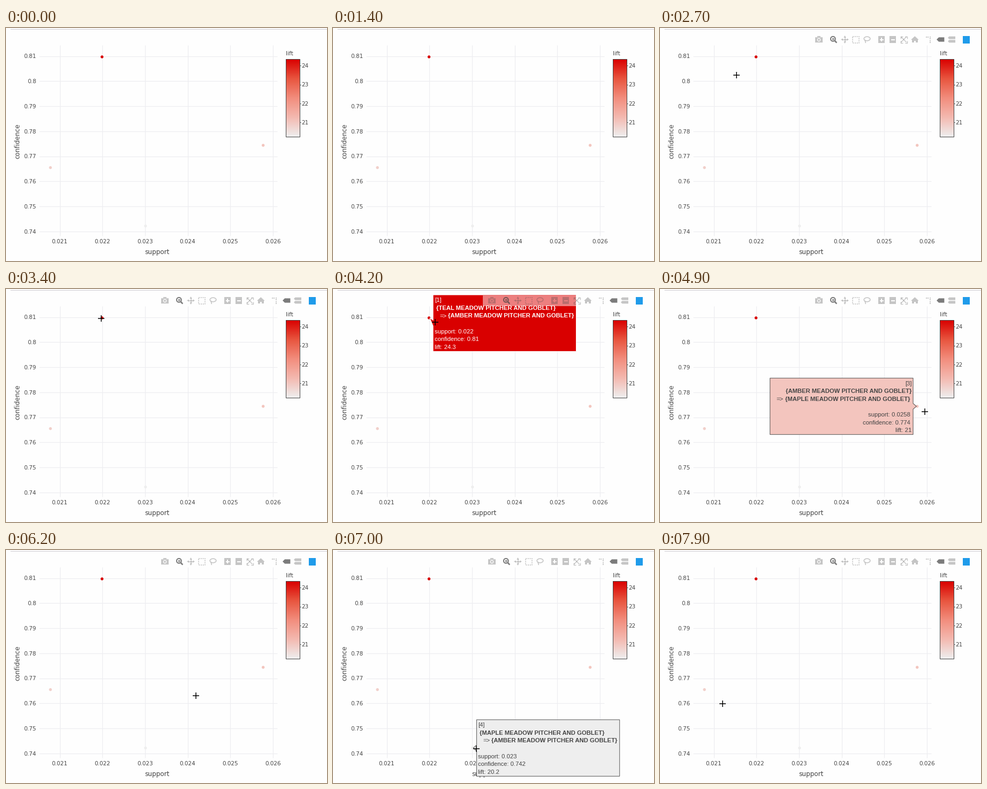
Recreate the animation shown at these times as a matplotlib script. Size 600 by 435 pixels, loop 8000 ms.

```python
import numpy as np
import matplotlib.pyplot as plt
from matplotlib.animation import FuncAnimation
from matplotlib.colors import LinearSegmentedColormap
from matplotlib.patches import PathPatch, Polygon, Rectangle
from matplotlib.path import Path

W, H, DPI = 600, 435, 80
STEP, FRAMES = 100, 80
PT = 72 / DPI  # points per pixel
INK, BG = "#444444", "#fefefe"
SOFT, STRONG = (INK, 0.3), (INK, 0.7)

fig = plt.figure(figsize=(W / DPI, H / DPI), dpi=DPI, facecolor=BG)
ax = fig.add_axes([0, 0, 1, 1])
ax.axis("off")

cmap = LinearSegmentedColormap.from_list(
    "lift", ["#eeeeee", "#f4b9b0", "#f28d7d", "#e8553f", "#d90000"])


def line(xs, ys, color=INK, width=1.0, **kw):
    return ax.plot(xs, ys, color=color, lw=width * PT,
                   solid_capstyle="butt", **kw)[0]


def text(x, y, s, size=10.4, font="DejaVu Sans", color=INK, **kw):
    return ax.text(x, y, s, fontsize=size * PT, family=font, color=color,
                   va="baseline", **kw)


# ---- data to pixels ----------------------------------------------------
def px(support):
    return 100.6 + 79680 * (support - 0.021)


def py(confidence):
    return 52.5 + 4677 * (0.81 - confidence)


def shade(lift):
    return cmap(float(lift - 20.2) / 4.1)


# support, confidence, lift
RULES = [(0.02199, 0.8097, 24.3), (0.02078, 0.7655, 20.8),
         (0.02577, 0.7744, 21.0), (0.02301, 0.7422, 20.2)]


def draw_chart():
    line([8, W], [1.5, 1.5], "#cfccd2")
    for s in np.arange(0.021, 0.0265, 0.001):
        line([px(s)] * 2, [32, 388], "#ededf1", 1.2, zorder=1)
        text(px(s), 402, f"{s:.3f}", ha="center")
    for c in np.arange(0.74, 0.815, 0.01):
        line([62, 507], [py(c)] * 2, "#ededf1", 1.2, zorder=1)
        text(57, py(c) + 3.9, f"{c:.2g}", ha="right")
    text(282, 422, "support", 12, ha="center")
    text(25, 211.5, "confidence", 12, ha="center", rotation=90,
         rotation_mode="anchor")

    for s, c, lift in RULES:
        ax.add_patch(plt.Circle((px(s), py(c)), 2.7, fc=shade(lift),
                                ec="none", zorder=3))

    ax.imshow(np.linspace(1, 0, 256)[:, None], cmap=cmap, aspect="auto",
              extent=(523, 549, 203, 58), zorder=2)
    ax.add_patch(Rectangle((522.8, 57.8), 26, 145.2, fc="none", ec=INK,
                           lw=PT, zorder=3))
    text(523, 51.3, "lift")
    for lift in range(21, 25):
        y = 70.2 + 35.3 * (24 - lift)
        line([549, 551], [y, y])
        text(552.2, y + 3.9, lift)
    ax.set(xlim=(0, W), ylim=(H, 0))


# ---- toolbar -----------------------------------------------------------
def rect(x, y, w, h):
    return np.array([(x - w / 2, y - h / 2), (x + w / 2, y - h / 2),
                     (x + w / 2, y + h / 2), (x - w / 2, y + h / 2)])


def disc(x, y, r, n=32, turn=0.0):
    a = turn + np.arange(n) * 2 * np.pi / n
    return np.column_stack([x + r * np.cos(a), y + r * np.sin(a)])


def tag(x, y, w, h):
    tip, tail, half = x - w / 2, x + w / 2, h / 2
    neck = tip + half
    return np.array([(tip, y), (neck, y - half), (tail, y - half),
                     (tail, y + half), (neck, y + half)])


def draw_toolbar():
    parts = []
    mid = 21.5

    def fill(outer, *holes, color=SOFT, z=11):
        loops = [outer] + [h[::-1] for h in holes]
        paths = [Path(np.vstack([p, p[:1]]), closed=True) for p in loops]
        parts.append(ax.add_patch(PathPatch(
            Path.make_compound_path(*paths), fc=color, ec="none", zorder=z)))

    def stroke(xs, ys, width=1.5, color=SOFT, **kw):
        parts.append(line(xs, ys, color, width, zorder=11, **kw))

    fill(rect(431.5, mid, 303, 20), color=("white", 0.5), z=10)

    # camera
    fill(rect(297, 22.2, 14, 9.8), disc(297, 22, 3.3))
    fill(disc(297, 22, 2))
    fill(rect(297, 16.4, 5.5, 1.8))

    # magnifier
    fill(disc(323.3, 20.3, 5.4), disc(323.3, 20.3, 3.4), color=STRONG)
    stroke([326.9, 330.3], [23.9, 27.6], 2.6, STRONG)
    stroke([321, 325.6], [20.3, 20.3], 1.2, STRONG)
    stroke([323.3, 323.3], [18, 22.6], 1.2, STRONG)

    # pan
    stroke([341, 350], [mid, mid])
    stroke([345.5, 345.5], [17, 26])
    for a in np.arange(4) * np.pi / 2:
        fill(disc(345.5 + 5 * np.cos(a), mid + 5 * np.sin(a), 2.5, 3, a))

    # box select, lasso
    box = rect(366, mid, 12, 12)
    stroke(*np.vstack([box, box[:1]]).T, 1.7, ls=(0, (1.2, 1)))
    a = np.linspace(2.3, 2.3 + 2 * np.pi, 40)
    stroke(np.append(387 + 5.8 * np.cos(a), 384.5),
           np.append(20 + 3.8 * np.sin(a), 28), 1.6)

    # zoom in, zoom out
    bar = rect(0, mid, 7, 2)
    stems = [rect(0, mid + d, 2, 2.5) for d in (-2.25, 2.25)]
    for x, holes in [(414, [bar] + stems), (435, [bar])]:
        fill(rect(x, mid, 12.4, 12.4), *[h + (x, 0) for h in holes])

    # autoscale
    for sx in (-1, 1):
        for sy in (-1, 1):
            x, y = 455.5 + 6 * sx, mid + 6 * sy
            stroke([455.5, x - sx], [mid, y - sy], 1.4)
            stroke([x - 4 * sx, x, x], [y, y, y - 4 * sy], 1.4)

    # home
    fill(np.array([(469, 22), (476.3, 15.3), (483.6, 22)]))
    fill(rect(476.3, 24.7, 10.4, 5.4), rect(476.3, 25.6, 3, 3.6))

    # spike lines
    for k in range(3):
        fill(rect(497.5 + 3.7 * k, 17.2, 2, 2))
        fill(rect(505.2, 20.4 + 3.3 * k, 2, 2))

    # hover tags
    fill(tag(524.2, mid, 14.4, 8.2), color=STRONG)
    for y in (mid - 3.3, mid + 3.3):
        fill(tag(545, y, 14, 5))

    fill(rect(572.4, 21.6, 13.8, 13.8), color="#1f9bea")
    return parts


# ---- hover labels ------------------------------------------------------
def draw_label(n, lhs, rhs, side=1):
    """Callout for rule n; side is 1 to open rightwards, -1 leftwards."""
    support, conf, lift = RULES[n - 1]
    x, y = px(support), py(conf)
    top = max(y - 52.7, 11)
    mid, low = top + 52.7, top + 105.4
    near, far = x + 7.6 * side, x + 275 * side
    color = shade(lift)
    ink = "white" if color[1] < 0.5 else INK
    parts = [ax.add_patch(Polygon(
        [(near, mid - 5.3), (x + 1.3 * side, y), (near, mid + 5.3),
         (near, low), (far, low), (far, top), (near, top)],
        fc=color, ec=ink, lw=0.9 * PT, zorder=6))]
    style = dict(ha="left" if side > 0 else "right", zorder=7)

    def row(i, s, shift=2.7, **kw):
        t = text(near + shift * side, top + 13.2 + 14.6 * i, s, 11.3,
                 "Liberation Sans", ink, **style, **kw)
        parts.append(t)
        return t

    row(0, f"[{n}]")
    row(1, "{" + lhs + "}", 5.7 if side > 0 else 2.7, weight="bold")
    bold = row(2, "{" + rhs + "}", 28 if side > 0 else 5.7, weight="bold")
    parts.append(ax.annotate(
        "=>", xy=(0, bold.get_position()[1]), xycoords=(bold, "data"),
        xytext=(-3 * PT, 0), textcoords="offset points", ha="right",
        va="baseline", fontsize=11.3 * PT, family="Liberation Sans",
        color=ink, zorder=7, annotation_clip=False))
    pad = 2.7 if side > 0 else 5.7
    row(4, f"support: {support:.3g}", pad)
    row(5, f"confidence: {conf:.3g}", pad)
    row(6, f"lift: {lift:.3g}")
    return parts


TEAL, AMBER, MAPLE = (f"{kind} MEADOW PITCHER AND GOBLET"
                      for kind in ("TEAL", "AMBER", "MAPLE"))

draw_chart()
# artists with the span of time (ms) in which they show
SPANS = [(draw_toolbar(), 2300, 8000),
         (draw_label(1, TEAL, AMBER), 3500, 4350),
         (draw_label(3, AMBER, MAPLE, side=-1), 4700, 5650),
         (draw_label(4, MAPLE, AMBER), 6600, 7700)]

# cursor glides: start, end, x, y of the place reached
ENTER, START = 2300, (119, 112)
GLIDES = [(2300, 3200, 177.5, 54.5), (3700, 4200, 191.3, 62),
          (4200, 4900, 494.5, 229), (5500, 6200, 354.5, 272),
          (6200, 6700, 267.5, 371), (7600, 7900, 116.5, 287)]


def cursor_at(t):
    pos = np.array(START, float)
    for t0, t1, x, y in GLIDES:
        u = np.clip((t - t0) / (t1 - t0), 0, 1)
        pos += (np.array([x, y]) - pos) * u * u * (3 - 2 * u)
    return pos


bars = [line([], [], "black", 1.5, zorder=20) for _ in range(2)]


def update(i):
    t = i * STEP
    for parts, start, end in SPANS:
        for p in parts:
            p.set_visible(start <= t < end)
    x, y = cursor_at(t)
    bars[0].set_data([x - 6, x + 6], [y, y])
    bars[1].set_data([x, x], [y - 6, y + 6])
    for b in bars:
        b.set_visible(t >= ENTER)
    return bars


anim = FuncAnimation(fig, update, frames=FRAMES, interval=STEP, repeat=True,
                     repeat_delay=0, init_func=lambda: update(0), blit=False)
plt.show()
```
